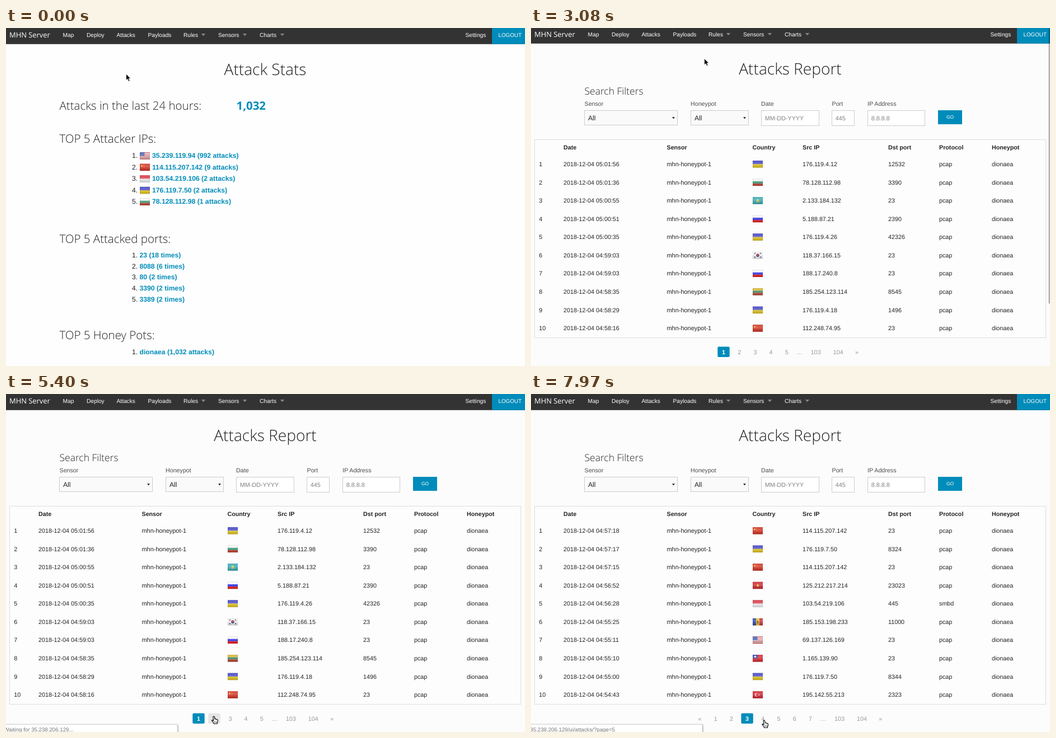
Recreate the animation shown at these times as an HTML page. Size 927 by 604 pixels, loop 8 s.

```html
<!DOCTYPE html>
<html lang="en">
<head>
<meta charset="utf-8">
<title>Attack dashboard</title>
<style>
  html, body { margin: 0; width: 100%; height: 100%; overflow: hidden; background: #fefefe; }
  svg { display: block; width: 100vw; height: 100vh; }
  text { font-family: "Liberation Sans", Arial, sans-serif; fill: #222; white-space: pre; text-rendering: geometricPrecision; }
  .head { font-family: "Open Sans", sans-serif; font-weight: 300; }
  .brand { font-family: "Open Sans", sans-serif; fill: #fff; }
  .big { font-family: "Open Sans", sans-serif; font-weight: 700; fill: #008cba; }
  .b { font-weight: 700; }
  .link { font-weight: 700; fill: #008cba; }
  .white { fill: #fff; }
  .label { fill: #4d4d4d; }
  .hint { fill: #808080; }
  .pager { fill: #999; }
  .on { fill: #fff; font-weight: 700; }
  .mid { text-anchor: middle; }
</style>
</head>
<body>
<svg id="stage" viewBox="0 0 927 604" preserveAspectRatio="none"></svg>
<script>
const LOOP = 8000;
const BLUE = '#008cba';
const NAV_H = 28.8;

const text = (x, y, size, str, cls = '') =>
  `<text x="${x}" y="${y}" font-size="${size}" class="${cls}">${str}</text>`;
const rect = (x, y, w, h, fill, more = '') =>
  `<rect x="${x}" y="${y}" width="${w}" height="${h}" fill="${fill}" ${more}/>`;
const box = (x, y, w, h, fill = '#fff', line = '#ccc') =>
  rect(x + .5, y + .5, w - 1, h - 1, fill, `stroke="${line}"`);
const disc = (x, y, r, fill) => `<circle cx="${x}" cy="${y}" r="${r}" fill="${fill}"/>`;
const caret = (x, y, w, h, fill) =>
  `<path d="M${x - w / 2} ${y}h${w}l${-w / 2} ${h}z" fill="${fill}"/>`;
const group = (id, body) => `<g id="${id}">${body}</g>`;

// Flags, drawn in an 18 x 12.5 box
const W = 18, H = 12.5;
const bands = (...colors) =>
  colors.map((c, i) => rect(0, i * H / colors.length, W, H / colors.length, c)).join('');
const plain = c => rect(0, 0, W, H, c);
function star(x, y, r, fill) {
  const pts = Array.from({ length: 10 }, (_, i) => {
    const a = i * Math.PI / 5 - Math.PI / 2, d = i % 2 ? r * .4 : r;
    return [x + d * Math.cos(a), y + d * Math.sin(a)].map(v => v.toFixed(2)).join();
  });
  return `<polygon points="${pts.join(' ')}" fill="${fill}"/>`;
}
const FLAGS = {
  ua: bands('#3f3fc4', '#e6c91e'),
  bg: bands('#f6f6f4', '#2f9270', '#c8402f'),
  ru: bands('#fafafa', '#2424e8', '#ee1c1c'),
  lt: bands('#d8b529', '#3c8450', '#bd4034'),
  id: bands('#d8303e', '#f4f4f4'),
  kz: plain('#32a9b4') + disc(9, 5.6, 2.2, '#d9cf4a') +
    `<path d="M5 7q4 4 8 0" fill="none" stroke="#d9cf4a"/>`,
  kr: plain('#f8f8f8') + disc(9, 6.2, 2.9, '#2c3f9c') +
    `<path d="M6.1 6.2a2.9 2.9 0 0 1 5.8 0q-1.5 1.4-2.9 0t-2.9 0" fill="#d02a3c"/>` +
    `<path d="M3 4l2-2M13 2l2 2M3 8.6l2 2M13 10.6l2-2" stroke="#444" stroke-width="1.5"/>`,
  cn: plain('#d3301f') + star(3.6, 3.8, 2.2, '#f0c93a') +
    disc(7, 2, .5, '#f0c93a') + disc(8, 4, .5, '#f0c93a') + disc(7, 6, .5, '#f0c93a'),
  vn: plain('#cf2430') + star(9, 6.4, 3.2, '#f4dc3a'),
  md: plain('#e6c52c') + rect(0, 0, 6, H, '#2b45a8') + rect(12, 0, 6, H, '#cb2f3c') +
    rect(7.4, 4, 3.2, 5, '#8a5a2a'),
  tw: plain('#d8262c') + rect(0, 0, 9, 6.3, '#2d36a8') + disc(4.5, 3.2, 1.8, '#fff'),
  tr: plain('#d4202c') + disc(7, 6.3, 3, '#fff') + disc(7.9, 6.3, 2.4, '#d4202c') + star(11.3, 6.3, 1.6, '#fff'),
  us: bands('#d0424a', '#f2eeee', '#d0424a', '#f2eeee', '#d0424a', '#f2eeee', '#d0424a', '#f2eeee', '#d0424a') +
    rect(0, 0, 8.5, 6.6, '#4a5cae')
};
const flag = (code, x, y) => `<g transform="translate(${x} ${y})">${FLAGS[code]}` +
  rect(0, 0, W, H, 'url(#gloss)') +
  rect(.25, .25, W - .5, H - .5, 'none', 'stroke="#000" stroke-opacity=".18" stroke-width=".5"') + '</g>';

function nav() {
  const items = [[101.5, 'Map'], [144, 'Deploy'], [197.5, 'Attacks'], [253.5, 'Payloads'],
    [317, 'Rules'], [379, 'Sensors'], [453, 'Charts'], [820.5, 'Settings']];
  return rect(0, 0, 927, NAV_H, '#333') +
    group('navHover', rect(186, 0, 56, NAV_H, '#272727')) +
    rect(868, 0, 59, NAV_H, BLUE) +
    text(6, 17, 12.9, 'MHN Server', 'brand') +
    items.map(([x, s]) => text(x, 15.5, 10.2, s, 'white')).join('') +
    [352.5, 426.5, 493.5].map(x => caret(x, 10, 7.5, 4.2, '#858585')).join('') +
    text(879.5, 15.5, 9.8, 'LOGOUT', 'white');
}

function stats() {
  const size = 12.2;
  const list = (y, step, rows, draw) => rows.map((r, i) =>
    text(225, y + i * step, size, i + 1 + '.') + draw(r, y + i * step)).join('');
  const ips = ['us 35.239.119.94 (992 attacks)', 'cn 114.115.207.142 (9 attacks)',
    'id 103.54.219.106 (2 attacks)', 'ua 176.119.7.50 (2 attacks)', 'bg 78.128.112.98 (1 attacks)'];
  const ports = ['23 (18 times)', '8088 (6 times)', '80 (2 times)', '3390 (2 times)', '3389 (2 times)'];
  const link = (s, y) => text(238.5, y, size, s, 'link');
  const head = (y, s) => text(95.5, y, 20.5, s, 'head');
  return text(463, 84, 28.1, 'Attack Stats', 'head mid') +
    head(145.5, 'Attacks in the last 24 hours:') +
    text(411.5, 145.5, 20.4, '1,032', 'big') +
    head(205.3, 'TOP 5 Attacker IPs:') +
    list(232, 20.6, ips, (s, y) =>
      flag(s.slice(0, 2), 239, y - 10) + text(261, y, size, s.slice(3), 'link')) +
    head(383.5, 'TOP 5 Attacked ports:') +
    list(410, 19.7, ports, link) +
    head(556, 'TOP 5 Honey Pots:') +
    list(583, 20, ['dionaea (1,032 attacks)'], link);
}

const COLS = [58, 242.5, 395.5, 485, 638, 729, 823];

function report() {
  const labels = [[95.5, 'Sensor'], [285, 'Honeypot'], [411, 'Date'], [537.5, 'Port'], [601, 'IP Address']];
  const heads = ['Date', 'Sensor', 'Country', 'Src IP', 'Dst port', 'Protocol', 'Honeypot'];
  const select = (x, w) => box(x, 148, w, 27, '#fafafa') +
    text(x + 7, 166, 12.1, 'All') + caret(x + w - 7.5, 160.3, 5, 3, '#111');
  const input = (x, w, s) => box(x, 148, w, 28) + text(x + 6.7, 166, 10.8, s, 'hint');
  return text(463, 84, 28.1, 'Attacks Report', 'head mid') +
    text(95.5, 119.8, 17.5, 'Search Filters', 'head') +
    labels.map(([x, s]) => text(x, 140.3, 10.7, s, 'label')).join('') +
    select(95, 167) + select(285, 104) +
    input(411, 104, 'MM-DD-YYYY') + input(537, 41, '445') + input(601, 103, '8.8.8.8') +
    rect(727, 148, 43, 25, BLUE) + text(748.5, 163.3, 8.5, 'GO', 'white mid') +
    box(6, 200, 914, 355, '#fdfdfd', '#ddd') +
    group('strip', rect(7, 201, 301, 26.5, '#f4f4f4')) +
    heads.map((s, i) => text(COLS[i], 217.8, 10.7, s, 'b')).join('');
}

// time, country, address, port, protocol when not pcap
const PAGES = [
  `05:01:56 ua 176.119.4.12 12532
05:01:36 bg 78.128.112.98 3390
05:00:55 kz 2.133.184.132 23
05:00:51 ru 5.188.87.21 2390
05:00:35 ua 176.119.4.26 42326
04:59:03 kr 118.37.166.15 23
04:59:03 ru 188.17.240.8 23
04:58:35 lt 185.254.123.114 8545
04:58:29 ua 176.119.4.18 1496
04:58:16 cn 112.248.74.95 23`,
  `04:58:04 us 104.248.6.137 8088
04:58:03 bg 78.128.112.94 2690
04:57:57 ua 176.119.7.2 4732
` + ['57:21', '57:21', '57:20', '57:19', '57:19', '57:19', '57:18']
    .map(s => `04:${s} cn 114.115.207.142 23`).join('\n'),
  `04:57:18 cn 114.115.207.142 23
04:57:17 ua 176.119.7.50 8324
04:57:15 cn 114.115.207.142 23
04:56:52 vn 125.212.217.214 23023
04:56:28 id 103.54.219.106 445 smbd
04:55:25 md 185.153.198.233 11000
04:55:11 us 69.137.126.169 23
04:55:10 tw 1.165.139.90 23
04:55:00 ua 176.119.7.50 8344
04:54:43 tr 195.142.55.213 2323`
];

function rows(data) {
  return data.split('\n').map((line, i) => {
    const [time, country, ip, port, proto = 'pcap'] = line.split(' ');
    const y = 248 + i * 32.58;
    const cells = ['2018-12-04 ' + time, 'mhn-honeypot-1', null, ip, port, proto, 'dionaea'];
    return text(14.3, y, 10.8, i + 1) + flag(country, 396, y - 10) +
      cells.map((s, c) => s === null ? '' : text(COLS[c], y, c === 1 ? 10.95 : 10.75, s)).join('');
  }).join('');
}

function pager(active) {
  const names = [...(active > 1 ? ['«'] : []), ...Array.from({ length: active + 4 }, (_, i) => i + 1)];
  const step = 28.2;
  let x = [344, 315.5, 301.5][active - 1];
  let out = '';
  for (const n of names) {
    if (n === active) out += rect(x - 10.7, 570.5, 21.4, 18.5, BLUE, 'rx="2"');
    out += text(x, 583.8, 10.8, n, n === active ? 'on mid' : 'pager mid');
    x += step;
  }
  x -= step;
  for (const [gap, s] of [[23, '…'], [29, '103'], [40, '104'], [33.3, '»']])
    out += text(x += gap, 583.8, 10.8, s, 'pager mid');
  return out;
}

const arrow = '<path d="M0 0V11.6L2.7 9.2L4.6 13.5L6.7 12.6L4.8 8.4H8.3Z" ' +
  'fill="#000" stroke="#fff" stroke-width=".9" stroke-linejoin="round"/>';
const hand = '<path d="M-1.2 1.2Q-1 -.2 .2 .1Q1.1 .3 1.3 1.5L2 4.8Q3 4.2 3.6 5.2Q4.7 4.6 5.3 5.7' +
  'Q6.7 5.2 7 6.8L7.3 9L6.2 11.5V13.3H.2L-.2 11.7L-3 8.2Q-3.8 6.9 -2.6 6.6L-.2 8Z" ' +
  'fill="#fff" stroke="#000" stroke-width="1.1" stroke-linejoin="round"/>' +
  '<path d="M1.6 9v2.5M3.3 9v2.5M5 9v2.5" stroke="#000" stroke-width=".6"/>';

document.getElementById('stage').innerHTML =
  `<defs><linearGradient id="gloss" x2="0" y2="1">
    <stop offset="0" stop-color="#fff" stop-opacity=".12"/>
    <stop offset=".4" stop-color="#fff" stop-opacity=".22"/>
    <stop offset="1" stop-color="#000" stop-opacity=".16"/></linearGradient>
  <filter id="soft" x="-5%" y="-60%" width="110%" height="220%"><feGaussianBlur stdDeviation="1.4"/></filter></defs>` +
  rect(0, 0, 927, 604, '#fefefe', 'id="paper"') +
  group('scroll',
    group('stats', stats()) +
    group('report', report() +
      group('pageHover', rect(-10.7, 570.5, 21.4, 18.5, '#e6e6e6', 'rx="2"')) +
      PAGES.map((p, i) => group('page' + (i + 1), rows(p) + pager(i + 1))).join('')) +
    nav()) +
  rect(924.5, 0, 3.5, 492, '#000', 'id="bar" rx="1.7"') +
  group('status', rect(-6, 591, 313, 20, '#000', 'opacity=".4" filter="url(#soft)"') +
    rect(-4, 591, 310, 20, '#fff', 'rx="2"') +
    '<text id="statusText" y="603" font-size="9.7" style="fill:#777"></text>') +
  group('arrow', arrow) + group('hand', hand);

// Stepped tracks: each entry holds from its time on
const CURSOR = [
  [0, 214.5, 82], [750, 213, 79], [908, 211, 66], [1066, 208, 48], [1224, 205, 31],
  [1382, 203, 18, 1], [1540, 202, 13.2, 1], [1990, 207, 16, 1], [2150, 232, 33],
  [2310, 272, 46], [2480, 300, 53], [2640, 309.5, 54.5],
  [4090, 390, 230], [4300, 446.5, 397], [4450, 441, 470], [4610, 421, 530],
  [4780, 396, 562], [4940, 380, 574, 1], [5110, 371, 576, 1],
  [5700, 380, 577], [5850, 392, 576, 1], [6000, 398.5, 576.3, 1],
  [7355, 408, 577, 1], [7510, 422, 579, 1], [7665, 434, 580, 1], [7820, 440, 581, 1], [7970, 416.3, 583, 1]
];
const VIEW = [[0, 0], [2310, 1], [5550, 2], [7200, 3]];
const SCROLL = [[0, 0, 0], [3080, 1, .3], [3230, 3, .5], [3560, 16.7, .5], [3770, 0, .5],
  [4090, 0, .3], [4300, 0, .12], [4450, 0, 0]];
const HOVER = [[0, 0], [4940, 372], [5550, 0], [5850, 400], [7200, 0], [7510, 414], [7665, 442], [7970, 0]];
const HOST = '35.238.206.129';
const LINK = HOST + '/ui/attacks/';
const WAIT = 'Waiting for ' + HOST + '...';
const STATUS = [[0, ''], [1540, LINK], [2150, WAIT], [2310, ''], [5110, LINK + '?page=2'], [5250, WAIT],
  [5550, ''], [6000, LINK + '?page=3'], [6590, WAIT], [7200, ''], [7820, LINK + '?page=5']];

const el = id => document.getElementById(id);
const at = (track, t) => track.findLast(k => k[0] <= t).slice(1);
const show = (id, on) => { el(id).style.display = on ? '' : 'none'; };
const move = (id, x, y) => el(id).setAttribute('transform', `translate(${x} ${y})`);

function render(t) {
  const [x, y, pointing] = at(CURSOR, t);
  const [view] = at(VIEW, t);
  const [offset, alpha] = at(SCROLL, t);
  const [hover] = at(HOVER, t);
  const [status] = at(STATUS, t);

  show('stats', view === 0);
  show('report', view > 0);
  for (let i = 1; i <= 3; i++) show('page' + i, view === i);
  el('paper').setAttribute('fill', view ? '#fcfcfc' : '#fefefe');

  show('navHover', t >= 1382 && t < 2150);
  show('strip', t < 3080);
  show('pageHover', hover);
  move('pageHover', hover, 0);

  move('scroll', 0, -offset);
  move('bar', 0, offset * .82);
  el('bar').setAttribute('opacity', alpha);

  show('status', status);
  el('statusText').textContent = status;
  el('statusText').setAttribute('x', status === WAIT ? -3.5 : -1.7);

  show('arrow', !pointing);
  show('hand', pointing);
  move(pointing ? 'hand' : 'arrow', x, y);
}

const start = performance.now();
function tick() {
  render((performance.now() - start) % LOOP);
  requestAnimationFrame(tick);
}
tick();
</script>
</body>
</html>
```
